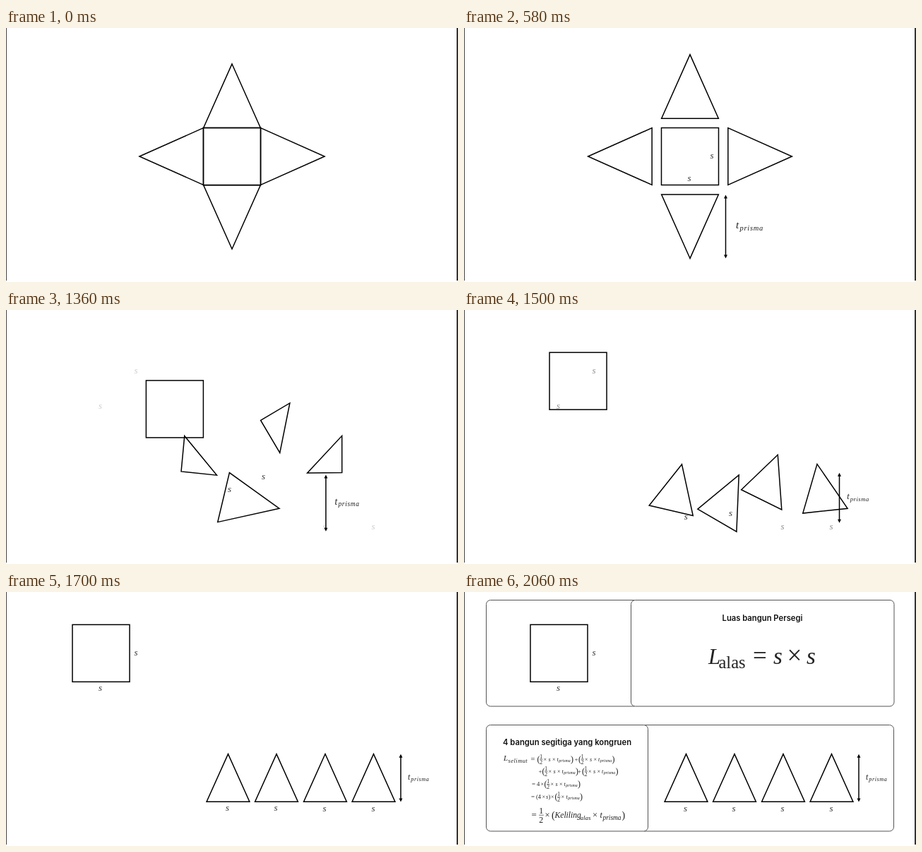
Animation, 640 px wide and 360 px high, one loop 4000 ms. Source, as an HTML page:

```html
<!DOCTYPE html>
<html lang="id">
<head>
<meta charset="utf-8">
<title>Jaring-jaring limas persegi</title>
<style>
html, body { margin: 0; width: 100%; height: 100%; overflow: hidden; background: #fff; }
svg { display: block; width: 100vw; height: 100vh; }
text { fill: #222; white-space: pre; }
.it, .rm { font-family: "Liberation Serif", "Noto Serif", serif; }
.it { font-style: italic; }
.title { font: 600 11.25px Inter, "Open Sans", sans-serif; text-anchor: middle; fill: #111; }
.label { font-size: 13px; text-anchor: middle; fill: #333; }
.shape { fill: none; stroke: #000; stroke-width: 1.5; stroke-linejoin: miter; }
.box { fill: #fff; stroke: #555; stroke-width: 1; }
</style>
</head>
<body>
<svg id="stage" viewBox="0 0 640 360">
  <path d="M.5 0V358" stroke="#444" stroke-width="1"/>
  <path d="M639 0V358" stroke="#000" stroke-width="1.6"/>
</svg>
<script>
const LOOP = 4000, TICK = 20;
const stage = document.getElementById("stage");

function add(parent, tag, attrs, text) {
  const el = document.createElementNS("http://www.w3.org/2000/svg", tag);
  for (const k in attrs) el.setAttribute(k, attrs[k]);
  if (text) el.textContent = text;
  parent.append(el);
  return el;
}
const clamp = u => Math.min(1, Math.max(0, u));
const mix = (a, b, f) => a + (b - a) * f;

// Same curve as the CSS "ease" keyword.
function ease(u) {
  if (u <= 0 || u >= 1) return clamp(u);
  const curve = (s, a, b) => 3 * (1 - s) * (1 - s) * s * a + 3 * (1 - s) * s * s * b + s * s * s;
  let lo = 0, hi = 1;
  for (let i = 0; i < 24; i++) {
    const s = (lo + hi) / 2;
    if (curve(s, .25, .25) < u) lo = s; else hi = s;
  }
  return curve(lo, .1, 1);
}

// ---- Panels and formulas ----
const panels = add(stage, "g", { opacity: 0 });
const box = (x1, y1, x2, y2) =>
  add(panels, "rect", { class: "box", x: x1, y: y1, width: x2 - x1, height: y2 - y1, rx: 6 });
const put = (x, y, str, size, cls = "rm") =>
  add(panels, "text", { x, y, class: cls, "font-size": size }, str);

box(31.5, 11.5, 246, 162);
box(236.5, 11.5, 609, 162);
box(250, 188.5, 608.5, 339);
box(31.5, 188.5, 260.5, 339);
add(panels, "text", { class: "title", x: 422.5, y: 41 }, "Luas bangun Persegi");
add(panels, "text", { class: "title", x: 146, y: 217 }, "4 bangun segitiga yang kongruen");

put(346, 102, "L", 31, "it");
put(360.5, 107.5, "alas", 24.5);
put(409, 102, "=", 35);
put(438, 102, "s", 33, "it");
put(457.5, 102, "×", 37);
put(485, 102, "s", 33, "it");

function half(x, y, size) {
  const mid = y - size * .3, w = size * .55;
  add(panels, "path", { d: `M${x} ${mid}h${w}`, stroke: "#222", "stroke-width": .6 });
  put(x + .2, mid - size * .18, "1", size * .95);
  put(x + .2, mid + size * .82, "2", size * .95);
}
// Writes (1/2 × [s ×] t_prisma) starting at x.
function halfTerm(x, y, withS) {
  put(x, y + 1, "(", 12);
  half(x + 3.6, y, 8);
  put(x + 9, y, "×", 8);
  let tx = x + 16;
  if (withS) {
    put(x + 16, y, "s", 8, "it");
    put(x + 21.5, y, "×", 8);
    tx = x + 28;
  }
  put(tx, y, "t", 8, "it");
  put(tx + 2.8, y + 1.3, "prisma", 5.9, "it");
  put(tx + 19.5, y + 1, ")", 12);
}

put(56, 239, "L", 11, "it");
add(panels, "text", { x: 62.5, y: 241.5, class: "it", "font-size": 8.4, "letter-spacing": .5 }, "selimut");
put(94.5, 239.5, "=", 10.5);
halfTerm(103.5, 239.5, true);
put(156.5, 239.5, "+", 9);
halfTerm(162, 239.5, true);

put(105.5, 256.5, "+", 9);
halfTerm(110.5, 256.5, true);
put(161, 256.5, "+", 9);
halfTerm(167, 256.5, true);

put(96, 275, "=", 9);
put(103, 275, "4", 8.5);
put(108.5, 275, "×", 8);
halfTerm(113.5, 275, true);

put(95, 293, "=", 9);
put(102, 293, "(4", 8.5);
put(110.5, 293, "×", 8);
put(116, 293, "s", 8, "it");
put(119.5, 293, ")", 8.5);
put(123, 293, "×", 8);
halfTerm(128.5, 293, false);

put(95.5, 320, "=", 13);
half(106, 320, 12.5);
put(114.5, 320, "×", 12.5);
put(124, 320.5, "(", 14);
put(128.5, 320, "Keliling", 11.6, "it");
put(164.5, 322.5, "alas", 9, "it");
put(182, 320, "×", 12.5);
put(192.5, 320, "t", 12, "it");
put(196.5, 322.5, "prisma", 9.4, "it");
put(223.5, 320.5, ")", 14);

// ---- Net of the pyramid ----
const square = add(stage, "rect", { class: "shape", width: 81, height: 81 });

// from/to: centre; out: direction when unfolding; rot: start and end angle;
// flip: turns over on the way; lean, twist: sway late in the flight.
const triangles = [
  { from: [234.2, 182], out: [-1, 0], to: [314.5, 263.4], rot: [-90, -180], flip: true, lean: 0, twist: 0 },
  { from: [320, 268], out: [0, 1], to: [383, 263.4], rot: [180, 0], flip: false, lean: -5.7, twist: 4 },
  { from: [320, 96.2], out: [0, -1], to: [452, 263.4], rot: [0, -180], flip: true, lean: 7.5, twist: 0 },
  { from: [405.8, 182], out: [1, 0], to: [520.5, 263.4], rot: [90, 180], flip: true, lean: 4.3, twist: 7 }
];
for (const tri of triangles) tri.el = add(stage, "polygon", { class: "shape" });

const sLabel = (x, y) => add(stage, "text", { class: "it label", x, y }, "s");
const movers = [
  { el: sLabel(351, 185), from: [351, 185], to: [382, 310.5] },
  { el: sLabel(319, 217), from: [319, 217], to: [313.5, 310.5] }
];
const late = [[184, 89.5], [133.5, 140], [451, 310.5], [520, 310.5]].map(p => sLabel(...p));

const arrow = add(stage, "g", {});
const shaft = add(arrow, "path", { stroke: "#000", "stroke-width": 1.5 });
const heads = add(arrow, "path", { fill: "#000" });
const height = add(stage, "g", {});
add(height, "text", { class: "it", "font-size": 15 }, "t");
add(height, "text", { class: "it", x: 5.6, y: 3, "font-size": 10.5, "letter-spacing": .7 }, "prisma");

function drawTriangle(tri, open, f) {
  const x = mix(tri.from[0] + tri.out[0] * 13.3 * open, tri.to[0], f);
  const y = mix(tri.from[1] + tri.out[1] * 13.3 * open, tri.to[1], f);
  const sway = f ** 3 * (1 - f) / .0915;
  const a = (mix(...tri.rot, f) + tri.twist * sway) * Math.PI / 180;
  const c = Math.cos(Math.PI * f);
  const turn = tri.flip ? Math.sign(c) * Math.sqrt(Math.abs(c)) : 1;
  const w = mix(80.7, 60.8, f) / 2, h = mix(90.5, 67.6, f) / 2 * turn;
  const lean = tri.lean * sway / 2;
  const points = [[lean, -h], [w - lean, h], [-w - lean, h]].map(([px, py]) =>
    (x + px * Math.cos(a) - py * Math.sin(a)).toFixed(2) + "," +
    (y + px * Math.sin(a) + py * Math.cos(a)).toFixed(2));
  tri.el.setAttribute("points", points.join(" "));
}

function drawArrow(f) {
  const x = mix(370.5, 559, f), top = mix(236.5, 229.7, f), end = mix(326.5, 297.5, f);
  shaft.setAttribute("d", `M${x} ${top + 3}V${end - 3}`);
  heads.setAttribute("d", `M${x} ${top}l2.5 5h-5zM${x} ${end}l2.5 -5h-5z`);
}

function render(t) {
  const open = t < 360 ? 0 : ease((t - 330) / 250);
  const f = t < 1260 ? 0 : ease((t - 1235) / 475);

  square.setAttribute("x", mix(279.5, 94, f));
  square.setAttribute("y", mix(141.5, 46.3, f));
  for (const tri of triangles) drawTriangle(tri, open, f);

  const shown = t < 380 ? 0 : open;
  for (const m of movers) {
    m.el.setAttribute("x", mix(m.from[0], m.to[0], f));
    m.el.setAttribute("y", mix(m.from[1], m.to[1], f));
    m.el.setAttribute("opacity", shown);
  }
  const fade = t < 1260 ? 0 : clamp((t - 1250) / 450);
  for (const el of late) el.setAttribute("opacity", fade);

  drawArrow(f);
  arrow.setAttribute("opacity", shown);
  height.setAttribute("opacity", shown);
  height.setAttribute("transform",
    `translate(${mix(385, 569, f)} ${mix(283.5, 265.5, f)}) scale(${mix(1, .78, f)})`);

  panels.setAttribute("opacity", clamp((t - 1780) / 280));
}

const start = performance.now();
function loop() {
  const t = (performance.now() - start) % LOOP;
  render(t - t % TICK);
  requestAnimationFrame(loop);
}
loop();
</script>
</body>
</html>
```
